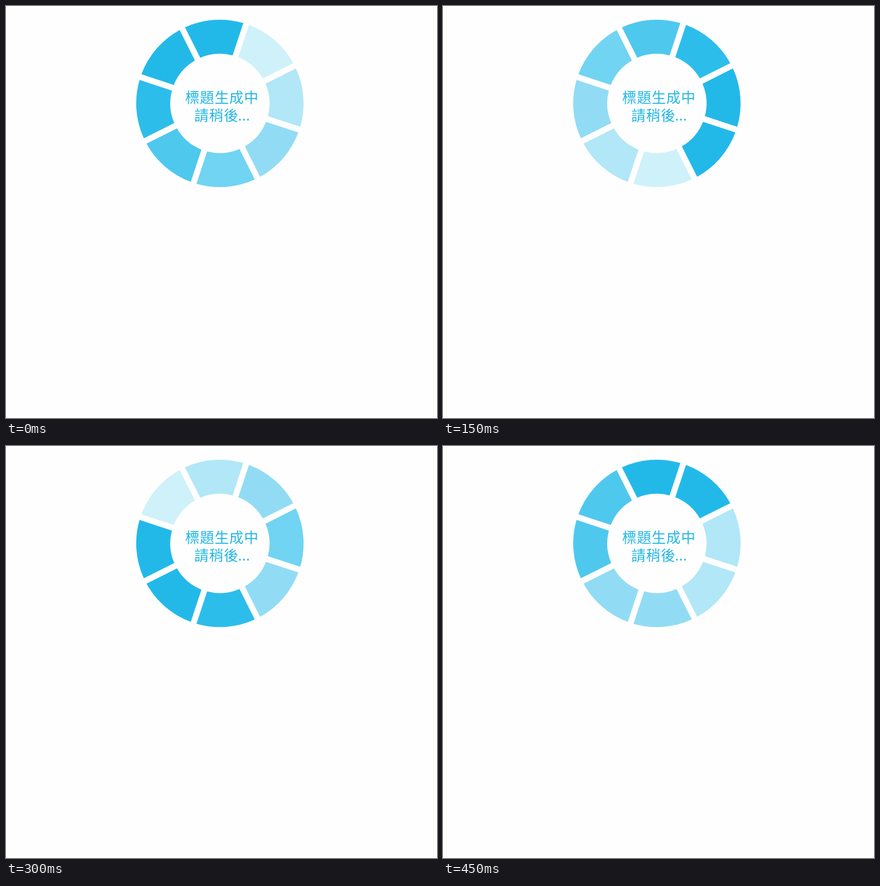
Recreate the animation shown at these times as an HTML page. Size 722 by 690 pixels, loop 600 ms.

```html
<!DOCTYPE html>
<html lang="zh-Hant">
<head>
<meta charset="utf-8">
<title>標題生成中</title>
<style>
html, body { margin: 0; width: 100%; height: 100%; overflow: hidden; background: #fefefe; }
svg {
  display: block;
  --t0: #cff1fa; --t1: #b1e7f7; --t2: #91dcf4; --t3: #70d4f2;
  --t4: #4fc8ee; --t5: #2dbdeb; --t6: #22b9e9;
}
/* each segment holds four tints, one per quarter of the loop */
use { fill: var(--a); animation: tint 600ms step-end infinite; }
@keyframes tint {
  0% { fill: var(--a); }
  25% { fill: var(--b); }
  50% { fill: var(--c); }
  75% { fill: var(--d); }
  100% { fill: var(--a); }
}
text { font: 24px "Noto Sans CJK TC", "Noto Sans CJK", "Noto Sans CJK JP", sans-serif; fill: #22b7e5; letter-spacing: .7px; }
.dots { letter-spacing: 0; }
</style>
</head>
<body>
<svg width="722" height="690" viewBox="0 0 722 690">
  <defs>
    <path id="seg" d="M-49-131.36A140.2 140.2 0 0 1 49-131.36L27.16-78.64A83.2 83.2 0 0 0-27.16-78.64Z"/>
  </defs>
  <g transform="translate(358.3 163.1) rotate(-4.2)">
    <use href="#seg" style="--a:var(--t6);--b:var(--t4);--c:var(--t1);--d:var(--t6)"/>
    <use href="#seg" transform="rotate(45)" style="--a:var(--t0);--b:var(--t5);--c:var(--t2);--d:var(--t6)"/>
    <use href="#seg" transform="rotate(90)" style="--a:var(--t1);--b:var(--t6);--c:var(--t3);--d:var(--t1)"/>
    <use href="#seg" transform="rotate(135)" style="--a:var(--t2);--b:var(--t6);--c:var(--t2);--d:var(--t1)"/>
    <use href="#seg" transform="rotate(180)" style="--a:var(--t3);--b:var(--t0);--c:var(--t5);--d:var(--t2)"/>
    <use href="#seg" transform="rotate(225)" style="--a:var(--t4);--b:var(--t1);--c:var(--t6);--d:var(--t2)"/>
    <use href="#seg" transform="rotate(270)" style="--a:var(--t5);--b:var(--t2);--c:var(--t6);--d:var(--t4)"/>
    <use href="#seg" transform="rotate(315)" style="--a:var(--t6);--b:var(--t3);--c:var(--t0);--d:var(--t4)"/>
  </g>
  <text x="300" y="162.4">標題生成中</text>
  <text x="315.6" y="192.2">請稍後<tspan class="dots" x="388.6">...</tspan></text>
</svg>
</body>
</html>
```
